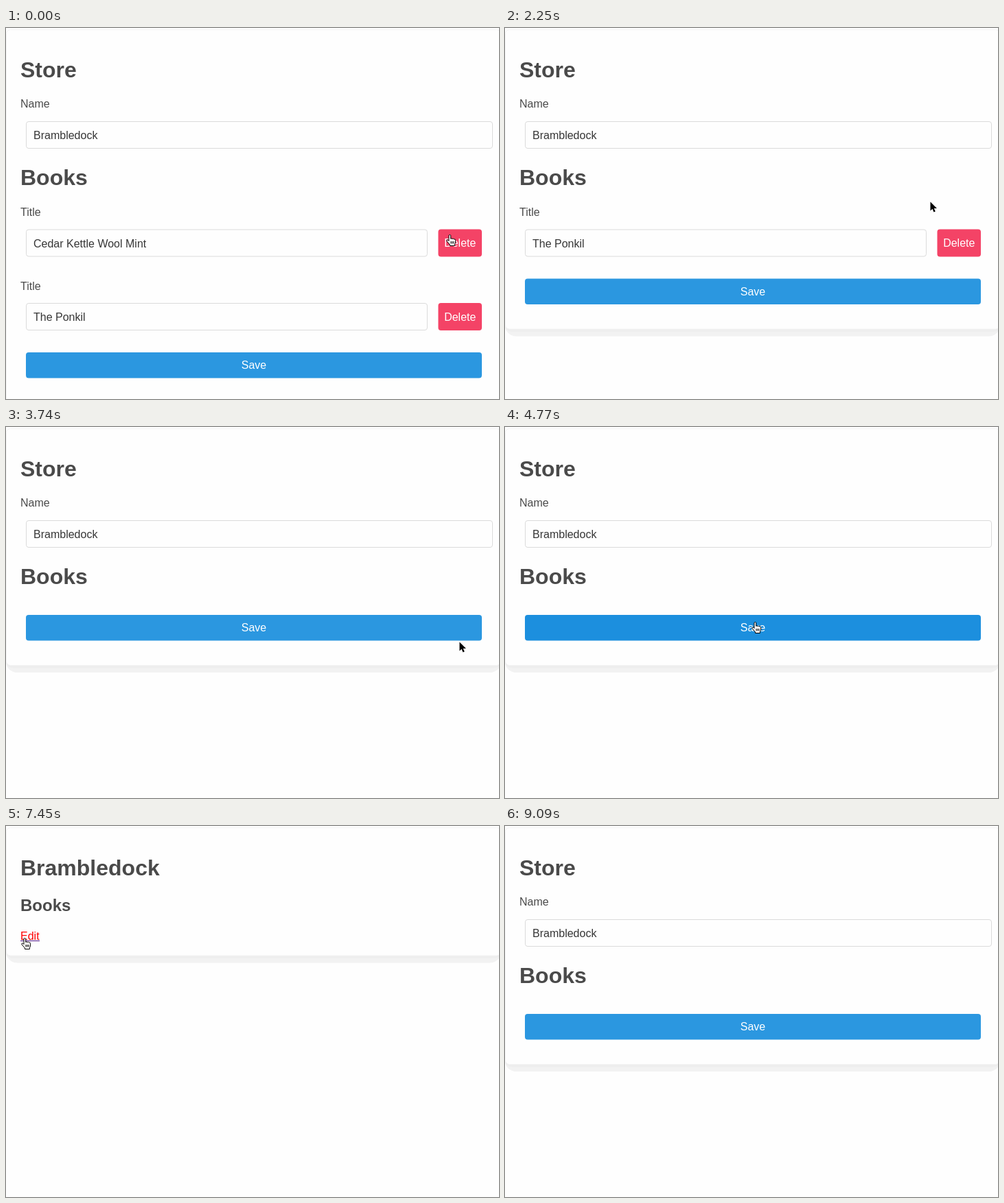
An HTML page that plays this animation: 718 by 541 pixels, repeating every 9.83 s.

```html
<!DOCTYPE html>
<html lang="en">
<head>
<meta charset="utf-8">
<title>Store form</title>
<style>
  html, body { margin: 0; width: 100%; height: 100%; overflow: hidden; background: #fefefe; }
  svg { display: block; font: 16px "Liberation Sans", Arial, sans-serif; }
</style>
</head>
<body>
<svg id="stage" width="718" height="541" viewBox="0 0 718 541"></svg>
<script>
const LOOP = 9830;
const STORE = 'Brambledock';
const BOOKS = ['Cedar Kettle Wool Mint', 'The Ponkil'];
const GREY = '#4a4a4a', INK = '#363636', PURPLE = '#551a8b';
const RED = ['#f44366', '#f5365b'], BLUE = ['#2b97e0', '#1c8fde'];

// Screens: start time, then the visible books, or null for the show page
const screens = [[0, BOOKS], [900, BOOKS.slice(1)], [3740, []], [5660, null], [7600, []]];

// Pointer: start time, hotspot x and y, shape
const pointer = [
  [0, 644, 301, 'hand'], [150, 664, 309, 'hand'], [300, 658, 311, 'hand'],
  [1950, 650, 300, 'hand'], [2100, 630, 272, 'arrow'], [2250, 619, 253, 'arrow'],
  [2390, 628, 270, 'arrow'], [2540, 664, 315, 'hand'], [2690, 660, 313, 'hand'],
  [3590, 660, 313, 'arrow'], [4030, 640, 312, 'arrow'], [4180, 575, 306, 'hand'],
  [4330, 490, 298, 'hand'], [4480, 415, 290, 'hand'], [4620, 375, 286, 'hand'],
  [4770, 362, 284, 'hand'], [5510, 362, 284, 'arrow'], [5960, 270, 250, 'arrow'],
  [6110, 110, 200, 'arrow'], [6250, 24, 163, 'hand'], [6700, 25, 163, 'hand'],
  [7600, 25, 163, 'arrow'], [8200, 26, 163, 'arrow'], [8790, 80, 157, 'beam'],
  [8940, 128, 144, 'beam'], [9090, 0, 0, 'none']
];

const shapes = {
  arrow: `<path d="M.5 .5V13.5l3-2.8 2 4.8 2.3-1-2-4.6h4.2z" fill="#000" stroke="#fff"
    stroke-width="2" stroke-linejoin="round" paint-order="stroke"/>`,
  hand: `<path transform="translate(-3)" d="M4 9.5V1.9a1.3 1.3 0 0 1 2.7 0V6.3q1.4-1 2.5.2
    1.5-.8 2.4.5 2-.5 2 1.5V11q0 2-1.2 3.5V16.5H5.5V15L1 9.8q-.8-1.6.8-1.9 1.2 0 2.2 1.6z
    M7 10v3.5M9 10v3.5M11 10v3.5" fill="#fff" stroke="#000" stroke-linejoin="round"/>`,
  beam: `<path d="M-3-8q3 0 3 2V6q0 2-3 2M3-8q-3 0-3 2M0 6q0 2 3 2M-2 3h4" fill="none" stroke="#333"/>`,
  none: ''
};

const at = (list, t) => list.findLast(item => item[0] <= t);
const box = (x, y, w, h, r, fill, extra = '') =>
  `<rect x="${x}" y="${y}" width="${w}" height="${h}" rx="${r}" fill="${fill}" ${extra}/>`;
const label = (x, y, text, fill = GREY, extra = '') =>
  `<text x="${x}" y="${y}" fill="${fill}" ${extra}>${text}</text>`;
const heading = (y, text, size = 32) =>
  label(21, y, text, GREY, `font-size="${size}" font-weight="700"`);
const input = (y, w, text) =>
  box(29.5, y + .5, w - 1, 39, 3.5, '#fefefe', 'stroke="#dbdbdb"') + label(40, y + 26, text, INK);

function card(bottom) {
  return box(0, bottom - 30, 721, 40.5, 16, '#f2f2f2') + box(1, bottom - 30, 719, 34, 9, '#eeeeee') +
    box(.5, 2.5, 720, bottom - 2.5, 6, '#fefefe', 'stroke="#f4f4f4"');
}

function showPage(pressed) {
  return card(189) + heading(72, STORE) + heading(124, 'Books', 24) +
    label(21, 166, 'Edit', pressed ? '#f00' : PURPLE) + box(21, 167, 28, 1, 0, PURPLE);
}

function formPage(books, button) {
  const saveY = books.length ? 258 + 107.5 * books.length : 274;
  const rows = books.map((title, i) => {
    const y = 293.5 + 107.5 * i;
    return label(21, y - 19.5, 'Title') + input(y, 585, title) +
      button(629.5, y, 63.5, 40, RED, 'Delete');
  });
  return card(saveY + 73.5) + heading(72, 'Store') + label(21, 116, 'Name') +
    input(136, 680, STORE) + heading(229, 'Books') + rows.join('') +
    button(29, saveY, 664, 37.5, BLUE, 'Save');
}

function draw(t) {
  const [, px, py, shape] = at(pointer, t);
  const books = at(screens, t)[1];
  const button = (x, y, w, h, colors, text) => {
    const hover = t >= 150 && px >= x && px <= x + w && py >= y && py <= y + h;
    return box(x, y, w, h, 4, colors[+hover]) +
      label(x + w / 2, y + h / 2 + 5.7, text, '#fff', 'text-anchor="middle"');
  };
  return (books ? formPage(books, button) : showPage(t >= 7450)) +
    `<g transform="translate(${px} ${py})">${shapes[shape]}</g>`;
}

const stage = document.getElementById('stage');
let shown = '';
function tick() {
  const picture = draw(performance.now() % LOOP);
  if (picture !== shown) stage.innerHTML = shown = picture;
  requestAnimationFrame(tick);
}
tick();
</script>
</body>
</html>
```
